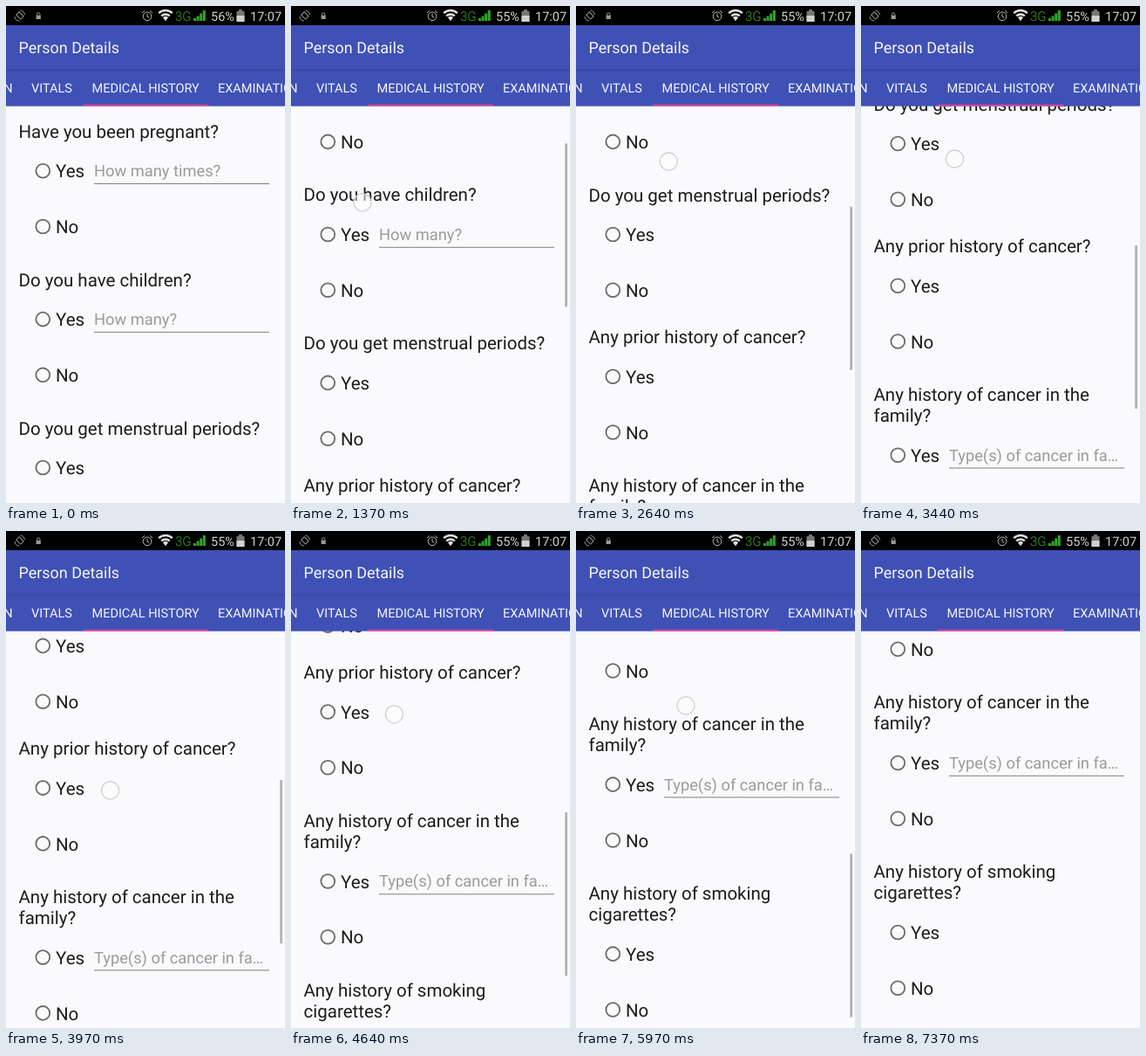
An HTML page that plays this animation: 320x569 px, repeating every 8 s.

```html
<!DOCTYPE html>
<html lang="en">
<head>
<meta charset="utf-8">
<title>Person Details</title>
<style>
  html, body { margin: 0; height: 100%; overflow: hidden; background: #faf9fb; }
  svg {
    display: block; width: 100vw; height: 100vh;
    font-family: Roboto, sans-serif; text-rendering: geometricPrecision;
  }
  .label { font-size: 20.5px; fill: #1c1c1c; }
  .hint { font-size: 18.3px; fill: #9b9b9b; }
  .radio { fill: none; stroke: #6a6a6a; stroke-width: 1.8; }
  .line { stroke: #808080; stroke-width: 1; }
  .tab { font-size: 14.5px; fill: #f4f5fb; }
  .status { font-size: 14.5px; fill: #d0d0d0; }
  .icon { fill: none; stroke: #999; stroke-width: 1; }
</style>
</head>
<body>
<svg viewBox="0 0 320 569">
  <defs>
    <linearGradient id="shade" x2="0" y2="1">
      <stop offset="0" stop-color="#000" stop-opacity=".12"/>
      <stop offset="1" stop-color="#000" stop-opacity="0"/>
    </linearGradient>
  </defs>
  <rect width="320" height="569" fill="#faf9fb"/>
  <g id="form"></g>
  <rect id="bar" x="314.2" width="2.8" height="187" fill="#b2b2b4"/>

  <rect width="320" height="22" fill="#000"/>
  <rect y="22" width="320" height="92.7" fill="#3f51b5"/>
  <rect y="72" width="320" height="4" fill="url(#shade)"/>
  <rect x="88" y="112.9" width="144.5" height="1.8" fill="#e8479a"/>
  <text x="14.5" y="54.3" font-size="17.95" fill="#f4f5fb">Person Details</text>
  <g class="tab">
    <text x="7.5" y="98.7" text-anchor="end">N</text>
    <text x="29" y="98.7">VITALS</text>
    <text x="98.5" y="98.7">MEDICAL HISTORY</text>
    <text x="243" y="98.7">EXAMINATION</text>
  </g>

  <g class="icon">
    <rect x="12.4" y="8.6" width="7" height="4.8" transform="rotate(45 16 11)"/>
    <path d="M16.5 5.2a5.6 5.6 0 0 1 5 5M10 12a5.6 5.6 0 0 0 5 5"/>
    <path d="M35.5 11V9.5a1.7 1.7 0 0 1 3.4 0V11"/>
    <rect x="34.6" y="10.8" width="5.2" height="4.2" fill="#999" stroke="none"/>
    <g stroke="#bbb">
      <circle cx="162" cy="11.8" r="4.8"/>
      <path d="M162 8.8v3.2l2.2 1.4M156 8l3-2.6M168 8l-3-2.6"/>
    </g>
  </g>
  <g fill="none" stroke="#ddd" stroke-width="2.4">
    <path d="M175.2 8.2a11 11 0 0 1 15.6 0M178.2 11.4a7 7 0 0 1 9.6 0"/>
    <path d="M180 13.2a4.5 4.5 0 0 1 6 0l-3 4z" fill="#ddd" stroke="none"/>
  </g>
  <text x="194" y="17" font-size="15" font-weight="300" fill="#3aa524">3G</text>
  <path d="M215 17v-3h3v3zM218.6 17v-5.5h3v5.5zM222.2 17v-8.5h3v8.5zM225.8 17v-12h3v12z" fill="#2fa52a"/>
  <text id="charge" class="status" x="235" y="17"></text>
  <path d="M264.5 6h2.5v-2h4v2h2.5v12h-9z" fill="#777"/>
  <rect x="264.5" y="11" width="9" height="7" fill="#d0d0d0"/>
  <text class="status" x="280" y="17">17:07</text>

  <circle id="finger" r="10" fill="#fff" fill-opacity=".5" stroke="#d2d2d4" stroke-width="1.3"/>
</svg>
<script>
const $ = id => document.getElementById(id);

// Question centre, text lines, hint beside "Yes"
const questions = [
  [143.5, ["Have you been pregnant?"], "How many times?"],
  [313.4, ["Do you have children?"], "How many?"],
  [483.3, ["Do you get menstrual periods?"]],
  [646, ["Any prior history of cancer?"]],
  [816, ["Any history of cancer in the", "family?"], "Type(s) of cancer in fa…"],
  [1010, ["Any history of smoking", "cigarettes?"]]
];

const text = (kind, x, y, str) => `<text class="${kind}" x="${x}" y="${y}">${str}</text>`;
const option = (y, str) =>
  `<circle class="radio" cx="42.3" cy="${y - .5}" r="7.9"/>` + text("label", 57, y + 7.2, str);

$("form").innerHTML = questions.map(([y, lines, hint]) => {
  const yes = y + 24 * lines.length + 21.7;
  return lines.map((str, i) => text("label", 14.5, y + 7.2 + 24 * i, str)).join("") +
    option(yes, "Yes") + option(yes + 63.8, "No") +
    (hint ? text("hint", 101, yes + 6, hint) +
      `<path class="line" d="M101 ${yes + 14.3}H302"/>` : "");
}).join("");

// [time, scroll]
const scrollKeys = [
  [0, 0], [1100, 0], [1700, 215], [1840, 215], [2040, 188], [2200, 188],
  [2640, 267], [2780, 267], [3440, 371], [3770, 371], [4640, 484], [4840, 523],
  [5240, 523], [5440, 555], [5700, 555], [5970, 595], [6400, 619.7], [8000, 619.7]
];

// [down, up, x at start, x at end, y + scroll]
const drags = [
  [1100, 2100, 80, 87, 322], [2200, 2700, 108, 106, 445], [2780, 3570, 110, 107, 546],
  [3770, 4860, 120, 118, 694], [5040, 6900, 130, 122, 795]
];

const mix = (a, b, u) => a + (b - a) * u;
const clamp = u => Math.max(0, Math.min(1, u));

function scrollAt(t) {
  const i = scrollKeys.findIndex(k => k[0] > t);
  const [t0, s0] = scrollKeys[i - 1], [t1, s1] = scrollKeys[i];
  return mix(s0, s1, (t - t0) / (t1 - t0));
}

function draw(now) {
  const t = now % 8000, scroll = scrollAt(t);
  $("form").setAttribute("transform", `translate(0 ${-scroll})`);
  $("charge").textContent = t < 500 ? "56%" : "55%";

  $("bar").setAttribute("y", 116 + scroll * .426);
  $("bar").setAttribute("opacity", t < 1100 ? 0 : 1 - clamp((t - 6950) / 300));

  const drag = drags.find(([down, up]) => t >= down && t < up);
  $("finger").setAttribute("visibility", drag ? "visible" : "hidden");
  if (drag) {
    const [down, up, x0, x1, base] = drag;
    $("finger").setAttribute("cx", mix(x0, x1, (t - down) / (up - down)));
    $("finger").setAttribute("cy", base - scroll);
  }
  requestAnimationFrame(draw);
}
requestAnimationFrame(draw);
</script>
</body>
</html>
```
